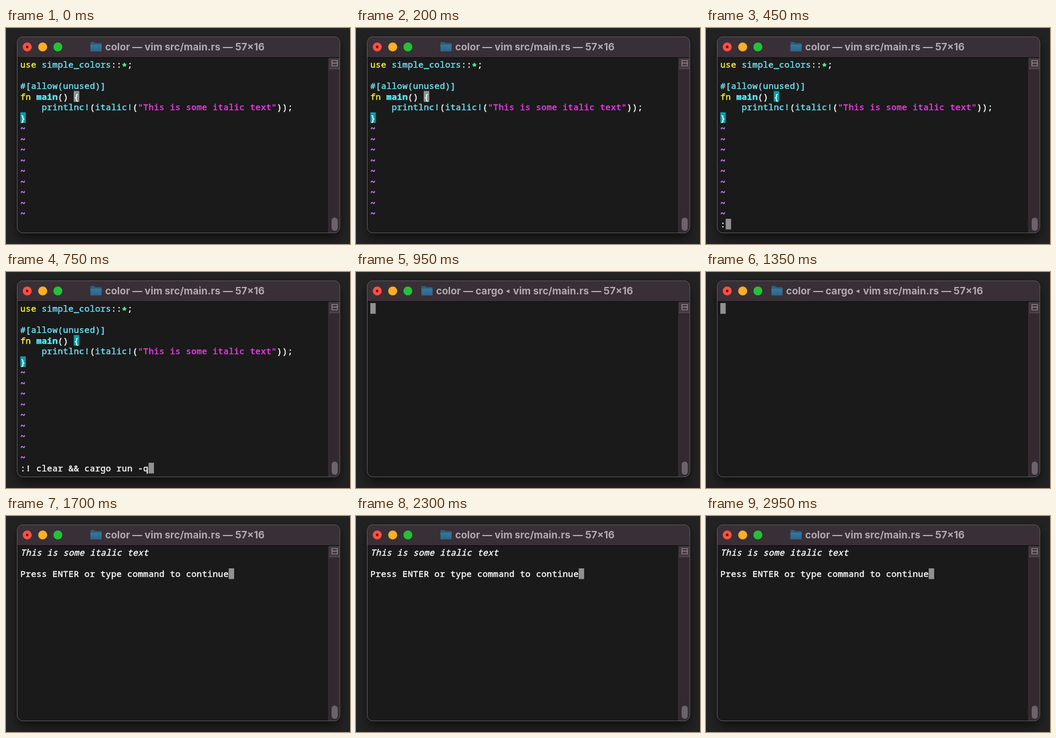
These frames come from a looping animation (600 px wide and 376 px high, 3 s). An HTML page:

```html
<!DOCTYPE html>
<html lang="en">
<head>
<meta charset="utf-8">
<title>Terminal</title>
<style>
  html, body { margin: 0; width: 100%; height: 100%; overflow: hidden; background: #232323; }
  svg { position: absolute; left: 0; top: 0; display: block; }
  .shadow {
    position: absolute; left: 20px; top: 15px; width: 562px; height: 341px;
    border-radius: 10px; box-shadow: 0 9px 20px rgba(0, 0, 0, .6);
  }
  .mono text {
    font: 500 15px "Noto Sans Mono", "DejaVu Sans Mono", monospace;
    letter-spacing: .32px; white-space: pre; stroke-width: .45px; stroke-linejoin: round;
  }
  .mono .bold { font-weight: 700; }
  .mono .italic { font-style: italic; }
  .title text { font: 700 17.35px Inter, "Liberation Sans", sans-serif; fill: #b1aaae; }
</style>
</head>
<body>
<div class="shadow"></div>
<svg width="600" height="376" viewBox="0 0 600 376">
  <defs>
    <clipPath id="frame"><rect x="19.5" y="15" width="563" height="342" rx="10"/></clipPath>
    <linearGradient id="front" x1="0" y1="0" x2="0" y2="1">
      <stop offset="0" stop-color="#36789b"/><stop offset="1" stop-color="#2c6688"/>
    </linearGradient>
    <g id="folder">
      <path d="M0 2.2Q0 .5 1.7 .5H6.5L8.8 2.6H17.8Q19.5 2.6 19.5 4.3V8H0Z" fill="#2a5f7e"/>
      <path d="M0 5.2H19.5V15.5Q19.5 17 18 17H1.5Q0 17 0 15.5Z" fill="url(#front)"/>
    </g>
  </defs>
  <g clip-path="url(#frame)">
    <rect x="19" y="15" width="564" height="342" fill="#1a1a1a"/>
    <rect x="19" y="15" width="564" height="37" fill="#392f36"/>
    <rect x="19" y="51" width="564" height="1.2" fill="#0d0b0c"/>
    <rect x="563" y="52.2" width="20" height="305" fill="#33292f"/>
    <rect x="562.3" y="52.2" width="1" height="305" fill="#443b40"/>
    <rect x="563.3" y="52.2" width="19" height="18.8" fill="#43393f"/>
    <rect x="563.3" y="70.5" width="19" height="1" fill="#60575c"/>
    <path d="M568.5 56.5h9.5v9.5h-9.5zM568.5 61.2h9.5" fill="none" stroke="#9a9296" stroke-width="1.2"/>
    <rect x="568" y="330" width="10.6" height="23" rx="5.3" fill="#6c646a"/>
  </g>
  <circle cx="37" cy="33" r="7.8" fill="#ff5047"/>
  <circle cx="37" cy="33" r="2.4" fill="#790803"/>
  <circle cx="64" cy="33" r="7.8" fill="#fdb024"/>
  <circle cx="90.5" cy="33" r="7.8" fill="#23c138"/>
  <rect x="19.5" y="15.3" width="562.7" height="341.4" rx="10" fill="none" stroke="#605c60"/>

  <g class="title" id="vimTitle">
    <use href="#folder" x="147.3" y="23.7"/>
    <text x="173" y="38.6">color — vim src/main.rs — 57×16</text>
  </g>
  <g class="title" id="cargoTitle">
    <use href="#folder" x="114" y="23.7"/>
    <text x="139.7" y="38.6">color — cargo</text>
    <path d="M261.5 33.5l6-3.3v6.6z" fill="#b1aaae"/>
    <text x="274" y="38.6">vim src/main.rs — 57×16</text>
  </g>
  <g class="mono">
    <g id="editor"></g>
    <g id="output"></g>
    <rect id="cursor" width="9.4" height="18.6" fill="#919191"/>
    <g id="brace"></g>
    <g id="command"></g>
  </g>
</svg>
<script>
const LEFT = 25, TOP = 54.1, CELL = 9.32, ROW = 18.53;
const WHITE = "#fbfbfb", YELLOW = "#f4f442", CYAN = "#70e2f4", BRIGHT = "#54f3fa",
      GREEN = "#62f3a0", PINK = "#ea3fe3", PURPLE = "#cb80f5", TEAL = "#0b9fa8";

const el = id => document.getElementById(id);
const cellX = col => LEFT + col * CELL;
const cellY = row => TOP + row * ROW;

function add(parent, tag, attrs) {
  const node = document.createElementNS("http://www.w3.org/2000/svg", tag);
  for (const key in attrs) node.setAttribute(key, attrs[key]);
  return parent.appendChild(node);
}

function write(parent, row, col, color, text, extra = {}) {
  const node = add(parent, "text",
    { x: cellX(col), y: cellY(row) + 14.9, fill: color, stroke: color, ...extra });
  node.textContent = text;
  return node;
}

// Writes runs of [colour, text, attributes] one after another on a row.
function line(parent, row, col, runs) {
  for (const [color, text, extra] of runs) {
    write(parent, row, col, color, text, extra);
    col += text.length;
  }
}

function block(parent, row, col) {
  add(parent, "rect", { x: cellX(col), y: cellY(row), width: 9.4, height: 18.6, fill: TEAL });
}

const editor = el("editor"), output = el("output"), cursor = el("cursor");
const bold = { class: "bold" };
block(editor, 3, 10);
block(editor, 5, 0);
line(editor, 0, 0, [[YELLOW, "use"], [WHITE, " "], [CYAN, "simple_colors"], [WHITE, "::"],
                    [GREEN, "*", { class: "bold", dy: 3 }], [WHITE, ";"]]);
line(editor, 2, 0, [[CYAN, "#[allow(unused)]"]]);
line(editor, 3, 0, [[YELLOW, "fn"], [WHITE, " "], [BRIGHT, "main", bold], [WHITE, "()"]]);
line(editor, 4, 4, [[CYAN, "printlnc!"], [WHITE, "("], [CYAN, "italic!"], [WHITE, "("],
                    [PINK, '"This is some italic text"'], [WHITE, "));"]]);
write(editor, 5, 0, WHITE, "}");
for (let row = 6; row < 15; row++) write(editor, row, 0, PURPLE, "~", bold);

write(el("brace"), 3, 10, WHITE, "{");
const command = write(el("command"), 15, 0, WHITE, "");
write(output, 0, 0, WHITE, "This is some italic text", { class: "italic" });
write(output, 2, 0, WHITE, "Press ENTER or type command to continue");

const LOOP = 3000;
const STEPS = [
  { at: 0, view: "editor", cursor: [3, 10], command: "" },
  { at: 250, view: "editor", cursor: [15, 1], command: ":" },
  { at: 600, view: "editor", cursor: [15, 24], command: ":! clear && cargo run -q" },
  { at: 950, view: "cargo", cursor: [0, 0], command: "" },
  { at: 1450, view: "output", cursor: [2, 39], command: "" }
];

const show = (node, on) => node.setAttribute("visibility", on ? "visible" : "hidden");
let current;

function draw() {
  const time = performance.now() % LOOP;
  const step = STEPS.filter(s => s.at <= time).pop();
  if (step !== current) {
    current = step;
    show(editor, step.view === "editor");
    show(el("brace"), step.view === "editor");
    show(output, step.view === "output");
    show(el("cargoTitle"), step.view === "cargo");
    show(el("vimTitle"), step.view !== "cargo");
    command.textContent = step.command;
    cursor.setAttribute("x", cellX(step.cursor[1]));
    cursor.setAttribute("y", cellY(step.cursor[0]));
  }
  requestAnimationFrame(draw);
}
draw();
</script>
</body>
</html>
```
